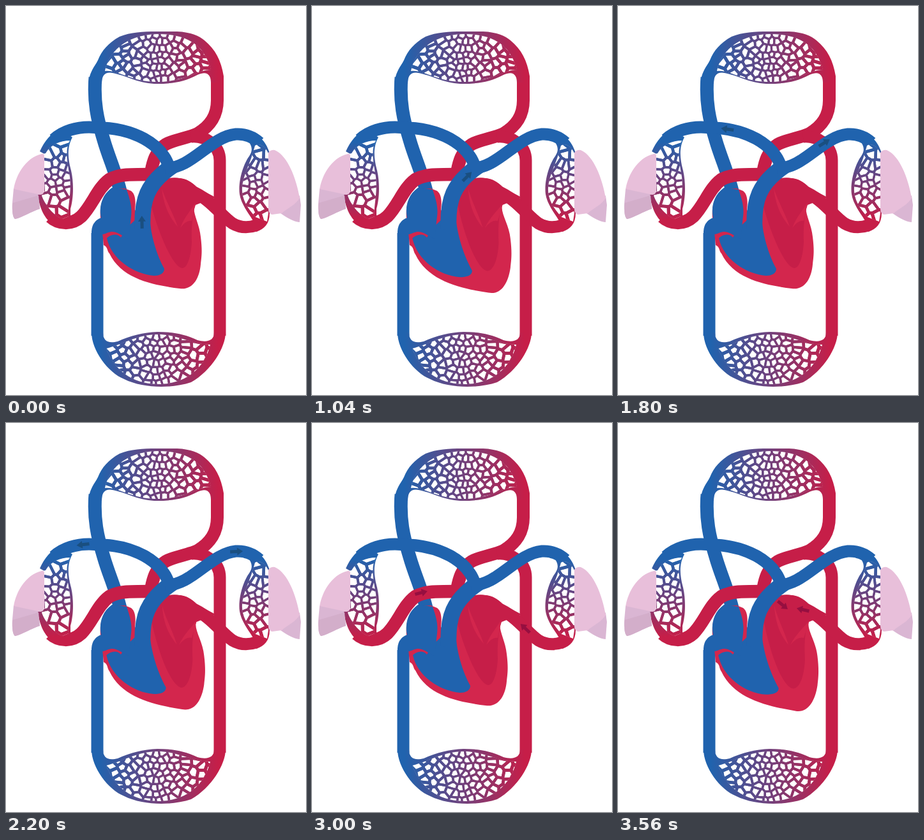
An HTML page for the animation above (3600 ms loop, 470 by 610 pixels).

```html
<!DOCTYPE html>
<html lang="en">
<head>
<meta charset="utf-8">
<title>Blood circulation</title>
<style>
  html, body { margin: 0; width: 100%; height: 100%; overflow: hidden; background: #fff; }
  svg { display: block; }
  .blue { fill: #2063ae; }
  .red { fill: #c61e48; }
  .wall { fill: #d3264d; }
  .tube { fill: none; stroke-width: 19; }
  .tube.blue { stroke: #2063ae; }
  .tube.red { stroke: #c61e48; }
</style>
</head>
<body>
<svg width="470" height="610" viewBox="0 0 470 610">
  <defs>
    <linearGradient id="across" gradientUnits="userSpaceOnUse" x1="145" y1="0" x2="333" y2="0">
      <stop stop-color="#2063ae"/><stop offset="1" stop-color="#c61e48"/>
    </linearGradient>
    <linearGradient id="down" gradientUnits="userSpaceOnUse" x1="0" y1="213" x2="0" y2="335">
      <stop stop-color="#2063ae"/><stop offset="1" stop-color="#c61e48"/>
    </linearGradient>
  </defs>

  <!-- veins and aorta -->
  <path class="tube blue" style="stroke-width:21" d="M140 112C137 150 143 178 153 210C161 238 171 258 179 290"/>
  <path class="tube blue" d="M143 517V356"/>
  <path class="tube red" style="stroke-width:20" d="M331 112V148C331 172 320 188 300 200C285 207 265 209 250 217C235 226 229 245 226 268"/>
  <path class="tube red" d="M290 205C312 203 335 218 335 242V517"/>
  <path class="tube red" style="stroke-width:20.5" d="M70 331C82 342 103 344 118 330C135 313 143 286 162 272C178 264 190 264 226 264"/>
  <path class="tube red" d="M290 290C320 302 338 330 355 341C367 348 380 348 392 344"/>

  <g id="heart"></g>

  <!-- pulmonary arteries -->
  <path class="tube blue" style="stroke-width:25" d="M214 350C212 305 220 278 262 250"/>
  <path class="tube blue" d="M256 254C245 216 200 191 140 190.5C110 188 88 197 75 209"/>
  <path class="tube blue" d="M250 254C290 256 320 205 360 201C376 200 388 206 397 214"/>

  <g id="meshes"></g>

  <!-- lungs -->
  <path fill="#dab6d3" d="M12 286L58 294L50 296L53 318C40 322 25 332 14 334Q9 330 10 308Z"/>
  <path fill="#d3aeca" d="M10 309L51 297L53 318C40 322 25 332 14 334Q9 330 10 309Z"/>
  <path fill="#e8bfda" d="M56 232C36 236 17 258 12 287L54 296Q60 295 60 288V236Q60 231 56 232Z"/>
  <path fill="#dab6d3" d="M460 297L462 312L460 339C450 338 440 332 430 325Z"/>
  <path fill="#e8bfda" d="M411 230Q415 225 421 226C442 235 455 272 460 301C455 311 441 317 432 325L417 327Q411 326 411 318Z"/>

  <g id="arrows"></g>
</svg>
<script>
const LOOP = 3600, PHASE = 1200, BEAT = 600;

function add(parent, tag, attrs) {
  const el = document.createElementNS('http://www.w3.org/2000/svg', tag);
  for (const name in attrs) el.setAttribute(name, attrs[name]);
  return parent.appendChild(el);
}
const group = id => document.getElementById(id);

function randomizer(seed) {
  return () => (seed = seed * 16807 % 2147483647) / 2147483647;
}

// Voronoi cell of one site: cut a box by the bisector to every other site.
function voronoiCell(site, sites) {
  const [sx, sy] = site;
  let poly = [[sx - 60, sy - 60], [sx + 60, sy - 60], [sx + 60, sy + 60], [sx - 60, sy + 60]];
  for (const other of sites) {
    if (other === site) continue;
    const dx = other[0] - sx, dy = other[1] - sy;
    const side = ([x, y]) => (x - sx - dx / 2) * dx + (y - sy - dy / 2) * dy;
    poly = poly.flatMap((p, i) => {
      const q = poly[(i + 1) % poly.length], a = side(p), b = side(q), k = a / (a - b);
      const kept = a <= 0 ? [p] : [];
      if (a * b < 0) kept.push([p[0] + (q[0] - p[0]) * k, p[1] + (q[1] - p[1]) * k]);
      return kept;
    });
  }
  return 'M' + poly.map(p => p.map(v => v.toFixed(1))).join('L') + 'Z';
}

// Capillary bed: coloured body, white inner area, net of cell borders on top.
// Towards both ends the cells get longer and flatter, and the borders thicker.
function addMesh(id, { body, holes, paint, center: [cx, cy], size: [length, breadth],
                       cells: [cols, rows], bend, upright, seed }) {
  const parent = group('meshes'), random = randomizer(seed), sites = [];
  for (let r = 0; r < rows; r++) {
    for (let c = 0; c < cols; c++) {
      const u = (c + 0.5 * (r % 2) + 0.25 + (random() - 0.5) * 0.65) / cols * 2 - 1;
      const v = (r + 0.5 + (random() - 0.5) * 0.65) / rows - 0.5;
      const along = length / 2 * (0.58 * u + 0.42 * u ** 3);
      const aside = v * breadth * (1 - 0.45 * u * u) + bend * u * u;
      const site = upright ? [cx + aside, cy + along] : [cx + along, cy + aside];
      site.border = 3.2 + 2.2 * u * u;
      sites.push(site);
    }
  }
  add(add(parent, 'clipPath', { id }), 'path', { d: holes });
  add(parent, 'path', { d: body, fill: paint });
  add(parent, 'path', { d: holes, fill: '#fff' });
  const net = add(parent, 'g', {
    fill: 'none', stroke: paint, 'stroke-linejoin': 'round', 'clip-path': `url(#${id})`
  });
  for (const s of sites) add(net, 'path', { d: voronoiCell(s, sites), 'stroke-width': s.border });
}

addMesh('head', {
  body: 'M129 122C131 102 139 95 144 85C150 70 160 58 178 48C195 41 215 40 235 40H268C290 41 303 47 311 54C328 68 337 85 341 110V120H321C321 108 315 101 300 108C280 119 260 122 237 122C210 122 195 112 175 107C158 101 150 105 150 122Z',
  holes: 'M155 102C160 75 185 45 237 44C290 44 312 66 321 100C300 100 280 119 237 119C195 119 175 99 155 102Z',
  paint: 'url(#across)', center: [238, 81], size: [175, 82], cells: [11, 8], bend: 9, seed: 71
});
addMesh('legs', {
  body: 'M134 512C134 540 160 575 185 585C215 600 260 600 290 590C322 572 344 535 344 512H326C326 525 315 528 300 524C280 514 260 511 237 511C215 512 195 517 175 526C160 530 152 525 152 512Z',
  holes: 'M157 537C180 532 205 515 238 515C270 515 290 531 320 531C312 565 285 593 238 593C195 592 170 570 157 537Z',
  paint: 'url(#across)', center: [239, 554], size: [175, 84], cells: [11, 8], bend: -7, seed: 1234
});
addMesh('leftLung', {
  body: 'M53 228C60 212 70 200 85 192L104 206C95 222 97 240 102 258C107 280 105 305 101 318L101 336L75 343C60 335 52 315 50 296L60 292V232Z',
  holes: 'M62 231C70 217 85 211 100 211C92 225 96 245 100 268C103 295 96 315 98 330L88 334C70 326 58 305 56 297L61 290L58 232Z',
  paint: 'url(#down)', center: [80, 271], size: [135, 46], cells: [8, 4], bend: 3, upright: true, seed: 505
});
addMesh('rightLung', {
  body: 'M413 230C405 208 395 200 375 202L379 211C390 225 383 232 378 240C368 258 364 280 366 295C368 310 380 325 386 335L392 354C405 350 413 341 413 325Z',
  holes: 'M390 219C398 213 408 223 411 231V325L409 338L391 331C376 315 369 300 370 285C371 265 384 245 390 219Z',
  paint: 'url(#down)', center: [391, 274], size: [135, 46], cells: [8, 4], bend: 7, upright: true, seed: 909
});

// Heart parts, each with its contracted and its filled outline.
const heartParts = [
  ['wall',
    'M186 286L196 290C204 296 203 310 202 320L215 330L226 300C232 275 250 268 270 270C285 270 297 280 300 290L296 310C290 322 303 340 305 362C308 385 306 395 305 405C303 428 292 446 272 443C235 438 182 430 162 388C158 384 160 378 153 375L150 345C144 320 150 296 164 288Z',
    'M186 286L196 290C204 296 203 310 202 320L215 330L226 300C232 275 250 268 270 270C285 270 297 280 300 290L300 310C294 322 311 342 313 366C316 390 314 402 313 412C309 438 297 456 278 452C235 445 182 433 162 390C158 384 160 378 153 375L150 345C144 320 150 296 164 288Z'],
  ['red',
    'M232 286C240 266 280 262 300 285L328 300L297 312C292 325 290 350 291 370C290 390 285 411 276 411C262 410 240 360 226 308Z',
    'M232 286C240 266 280 262 300 285L328 300L299 312C292 325 292 350 293 372C292 394 286 417 274 417C258 414 239 366 228 308Z'],
  ['wall',
    'M244 286C250 305 262 325 269 346C255 330 247 312 244 286Z',
    'M245 286C249 305 260 325 267 348C255 334 246 314 245 286Z'],
  ['wall',
    'M297 308L291 337Q283 335 273 348C280 330 290 320 297 308Z',
    'M300 310L291 337Q281 334 270 348C278 332 290 322 300 310Z'],
  ['blue',
    'M158 364C164 358 174 356 180 363L190 347L203 335L224 320C226 360 236 390 248 412C248 420 240 423 232 423C200 420 165 397 158 364Z',
    'M157 364C164 358 174 356 180 363L190 347L203 335L224 320C227 362 240 394 252 416C252 424 242 426 232 426C198 424 164 398 157 364Z']
].map(([kind, small, big]) => ({
  small, big: big.match(/\d+/g), el: add(group('heart'), 'path', { class: kind })
}));
add(group('heart'), 'path', {
  class: 'blue',
  d: 'M166 285L189 288C194 303 198 315 196 330C194 345 194 355 192 366L179 358C166 350 160 356 152 358H134Q133 338 149 332C146 318 148 298 166 285Z'
});

const arrows = [
  [0, '#1a4f80', 'M213 339C212 310 220 288 252 259'],
  [1, '#1a4f80', 'M240 224C215 199 180 194 170 193C145 188 118 188 96 197'],
  [1, '#1a4f80', 'M272 247C295 238 310 224 321 216C338 205 360 197 381 204'],
  [2, '#960f40', 'M104 335C125 328 130 300 150 278C160 268 168 267 176 265C205 260 240 268 263 290'],
  [2, '#960f40', 'M384 347C360 347 348 335 333 321C320 308 305 295 286 292']
].map(([phase, fill, d]) => {
  const track = add(group('arrows'), 'path', { d, fill: 'none' });
  const el = add(group('arrows'), 'path', { fill, d: 'M-10 -2.5H1V-6L10 0L1 6V2.5H-10Z' });
  return { phase, track, el, length: track.getTotalLength() };
});

function draw(time) {
  const t = time % LOOP, fill = t % BEAT / BEAT;
  for (const { el, small, big } of heartParts) {
    let i = 0;
    el.setAttribute('d', small.replace(/\d+/g, n => (+n + (big[i++] - n) * fill).toFixed(2)));
  }
  for (const { phase, track, el, length } of arrows) {
    const at = length * (t % PHASE) / PHASE;
    const p = track.getPointAtLength(at);
    const a = track.getPointAtLength(at - 3), b = track.getPointAtLength(at + 3);
    const angle = Math.atan2(b.y - a.y, b.x - a.x) * 180 / Math.PI;
    el.setAttribute('transform', `translate(${p.x} ${p.y}) rotate(${angle})`);
    el.style.display = Math.floor(t / PHASE) === phase ? '' : 'none';
  }
}

const start = performance.now();
function frame() {
  draw(performance.now() - start);
  requestAnimationFrame(frame);
}
frame();
</script>
</body>
</html>
```
